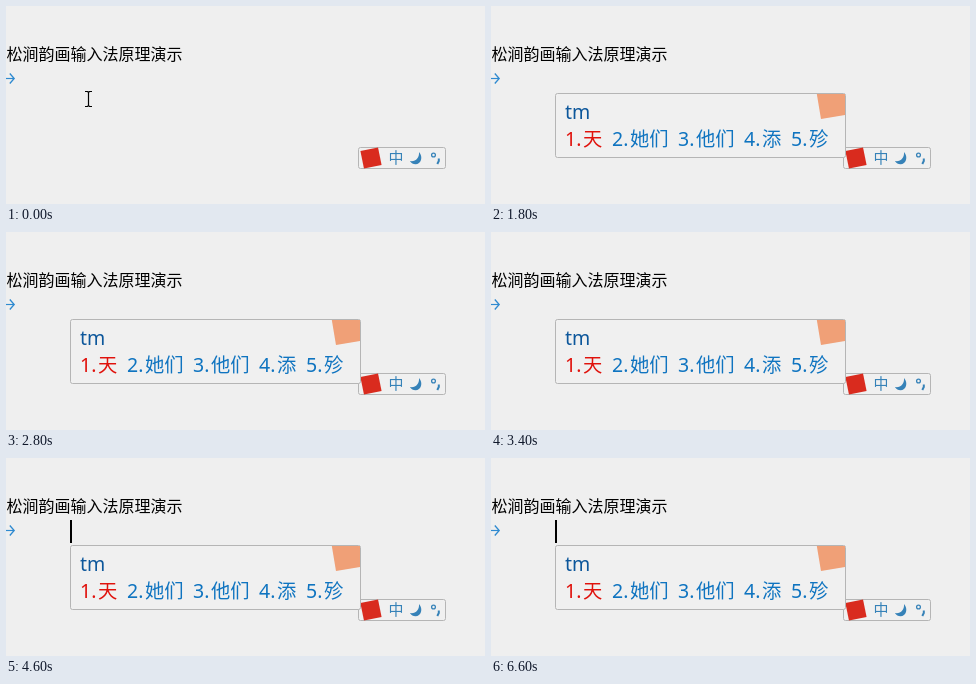
Write an HTML page with a canvas that moves like this. It is 479 px wide and 198 px high and loops after 7 s.

```html
<!DOCTYPE html>
<html lang="zh-CN">
<head>
<meta charset="utf-8">
<title>输入法原理演示</title>
<style>
  html, body { margin: 0; width: 100%; height: 100%; overflow: hidden; background: #efefef; }
  canvas { display: block; }
</style>
</head>
<body>
<canvas id="stage" width="479" height="198"></canvas>
<script>
const ctx = document.getElementById('stage').getContext('2d');
const LOOP = 7000;
const FONT = '"Noto Sans CJK SC", "Noto Sans CJK", sans-serif';
const LATIN = '"Noto Sans", sans-serif';
const BLUE = '#0f74c0', RED = '#e0120c', ICON = '#3682b8';
const PANEL = '#f0f0f0', BORDER = '#b5b5b5';

const candidates = {
  t: ['他'],
  tm: ['天', '她们', '他们', '添', '殄'],
  tmj: ['钿', '锝', '田径', '恬静', '天井']
};
const panelRight = { t: 194, tm: 355, tmj: 374 };

const typing = [
  [0, ''], [1400, 't'], [1800, 'tm'], [2200, 'tmj'], [2800, 'tm'],
  [3600, 'tmj'], [4200, 'tm'], [4800, 'tmj'], [5200, 'tm']
];
const pointer = [[0, [82, 93]], [200, [75, 85]], [400, [81, 83]], [600, null]];
const caretToggles = [
  400, 1000, 2000, 2200, 2400, 2800, 3000, 3400, 4000,
  4200, 4600, 4800, 5000, 5200, 5600, 6000, 6600
];

const valueAt = (steps, t) => steps.filter(([start]) => start <= t).pop()[1];

function text(str, x, y, size, color, family = FONT) {
  ctx.font = `${size}px ${family}`;
  ctx.fillStyle = color;
  ctx.fillText(str, x, y);
}

function line(points, color, width = 1) {
  ctx.beginPath();
  points.forEach(([x, y], i) => i ? ctx.lineTo(x, y) : ctx.moveTo(x, y));
  ctx.strokeStyle = color;
  ctx.lineWidth = width;
  ctx.stroke();
}

function panel(left, top, right, bottom) {
  ctx.beginPath();
  ctx.roundRect(left + 0.5, top + 0.5, right - left - 1, bottom - top - 1, 2);
  ctx.fillStyle = PANEL;
  ctx.fill();
  ctx.strokeStyle = BORDER;
  ctx.lineWidth = 1;
  ctx.stroke();
}

function tiltedSquare(x, y, size, angle, color) {
  ctx.save();
  ctx.translate(x, y);
  ctx.rotate(angle);
  ctx.fillStyle = color;
  ctx.fillRect(-size / 2, -size / 2, size, size);
  ctx.restore();
}

function drawPage() {
  ctx.fillStyle = '#efefef';
  ctx.fillRect(0, 0, 479, 198);
  text('松涧韵画输入法原理演示', 0.5, 54, 16, '#000');
  line([[0, 72.5], [8, 72.5]], '#2f8ad0', 1.2);
  line([[3.8, 67.5], [8.2, 72.5], [3.8, 77.5]], '#2f8ad0', 1.3);
}

function drawToolbar() {
  panel(352, 141, 440, 163);
  tiltedSquare(365, 152, 18, -0.2, '#d92b1e');
  text('中', 382.5, 157, 15, ICON);

  ctx.beginPath();
  ctx.moveTo(413, 146);
  ctx.bezierCurveTo(417.5, 151, 415, 158.3, 409.5, 158.3);
  ctx.quadraticCurveTo(406, 158.3, 404, 155);
  ctx.bezierCurveTo(409.5, 156, 413.5, 152, 413, 146);
  ctx.fillStyle = ICON;
  ctx.fill();

  ctx.beginPath();
  ctx.arc(427.5, 149, 1.9, 0, Math.PI * 2);
  ctx.strokeStyle = ICON;
  ctx.lineWidth = 1.3;
  ctx.stroke();
  line([[432.8, 152.5], [432.8, 155], [431.3, 158]], ICON, 2);
}

function drawCandidates(code) {
  const right = panelRight[code];
  panel(64, 87, right, 152);

  ctx.save();
  ctx.beginPath();
  ctx.rect(65, 88, right - 66, 63);
  ctx.clip();
  tiltedSquare(right - 13.5, 97, 28, -0.165, '#f0a077');
  ctx.restore();

  text(code, 74, 113, 19.5, '#0d579b', LATIN);
  let x = 74;
  candidates[code].forEach((word, i) => {
    const color = i ? BLUE : RED;
    text(`${i + 1}.`, x, 140, 19.5, color, LATIN);
    text(word, x + 18, 140, 19.3, color);
    x += 28 + 19 * word.length;
  });
}

function drawPointer([x, y]) {
  const cx = x + 0.5;
  line([[cx, y - 6], [cx, y + 6]], '#000', 1.2);
  for (const side of [-1, 1]) {
    const end = y + side * 7.5;
    line([[cx - 3.5, end], [cx - 1, end], [cx, end - side],
          [cx + 1, end], [cx + 3.5, end]], '#000', 1.2);
  }
}

function draw(t) {
  const code = valueAt(typing, t);
  const mouse = valueAt(pointer, t);
  const caretOn = caretToggles.filter(at => at <= t).length % 2 === 1;

  drawPage();
  drawToolbar();
  if (code) drawCandidates(code);
  if (caretOn) {
    ctx.fillStyle = '#000';
    ctx.fillRect(64, 62, 2, 23);
  }
  if (mouse) drawPointer(mouse);
}

const startTime = performance.now();
function frame() {
  draw((performance.now() - startTime) % LOOP);
  requestAnimationFrame(frame);
}
frame();
</script>
</body>
</html>
```
